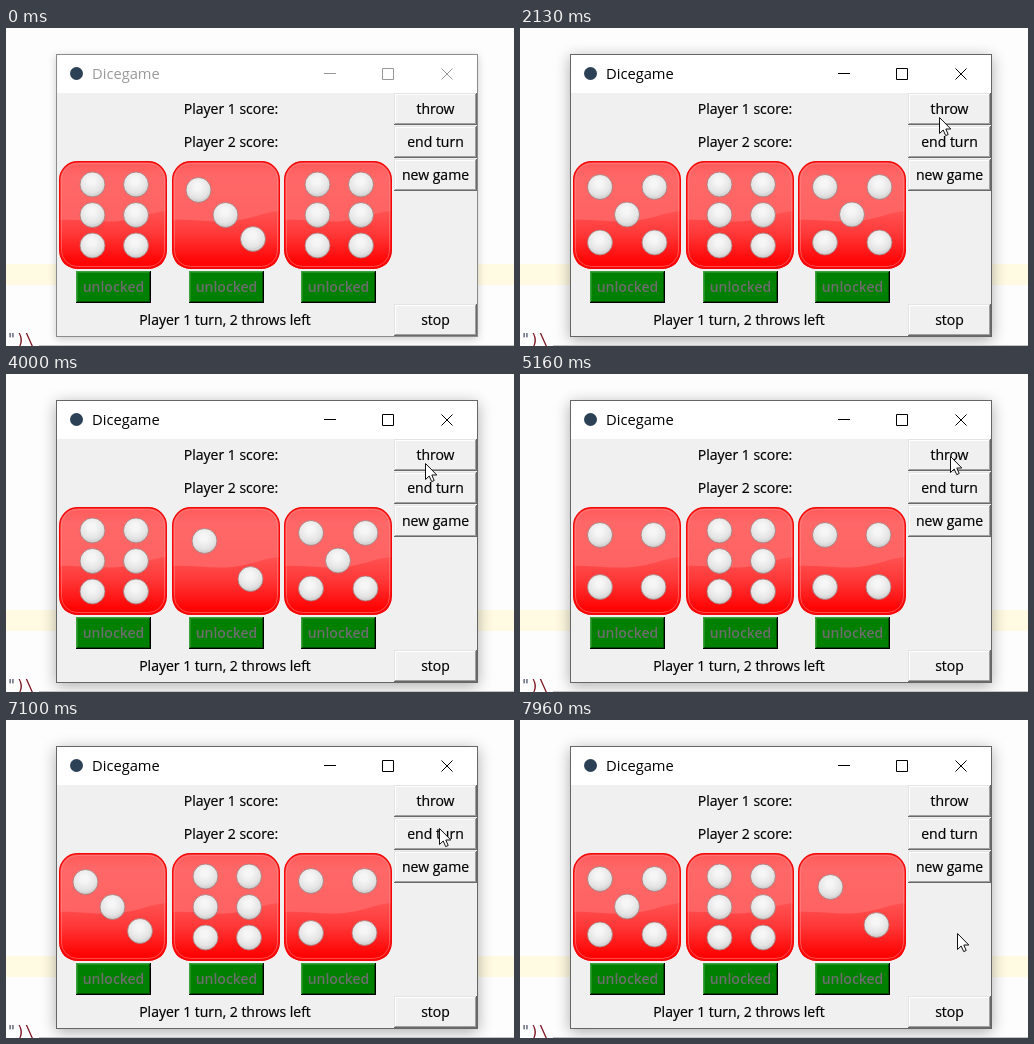
Write an HTML page that moves like this. It is 508 px wide and 318 px high and loops after 8000 ms.

```html
<!DOCTYPE html>
<html lang="en">
<head>
<meta charset="utf-8">
<title>Dicegame</title>
<style>
  html, body { margin: 0; width: 100%; height: 100%; overflow: hidden; background: #fdfdfd; }
  #stage { position: relative; width: 508px; height: 318px; max-height: 100%; overflow: hidden; contain: strict; }
  #line { position: absolute; left: 0; top: 236px; width: 508px; height: 21px; background: #fffae1; }
  #win { position: absolute; left: 50px; top: 26px; width: 420px; height: 281px; border: 1px solid #8c8c8c;
    background: linear-gradient(#fff 38px, #f0f0f0 38px); box-shadow: 0 2px 8px rgba(0, 0, 0, .2); }
  .active #win { border-color: #666; box-shadow: 0 3px 14px rgba(0, 0, 0, .32); }
  svg { position: absolute; left: 0; top: 0; display: block; overflow: hidden; }
  text { font: 14px "Open Sans", "Noto Sans", sans-serif; text-anchor: middle; stroke: #000; stroke-width: .2px; }
  .title { font-size: 14.7px; text-anchor: start; fill: #999; stroke: none; }
  .caps { fill: none; stroke: #999; }
  .active .title { fill: #000; }
  .active .caps { stroke: #000; }
  .lock { font-weight: 600; fill: #6d6d6d; stroke: none; }
  .code { font: 15px "DejaVu Sans Mono", monospace; text-anchor: start; fill: #7c1420; stroke: none; }
  .code tspan { fill: #4a5068; }
</style>
</head>
<body>
<div id="stage">
<div id="line"></div>
<div id="win"></div>
<svg width="508" height="318" viewBox="0 0 508 318">
  <defs>
    <linearGradient id="face" x1="0" y1="0" x2="0" y2="1">
      <stop offset="0" stop-color="#ff5a5a"/><stop offset=".15" stop-color="#ff6868"/>
      <stop offset=".55" stop-color="#ff6262"/>
    </linearGradient>
    <linearGradient id="low" x1="0" y1="0" x2="0" y2="1">
      <stop offset="0" stop-color="#ff5252"/><stop offset=".4" stop-color="#ff3838"/>
      <stop offset=".9" stop-color="#ff0404"/>
    </linearGradient>
    <radialGradient id="pip" cx=".47" cy=".36" r=".66">
      <stop offset=".2" stop-color="#f6f6f6"/><stop offset=".7" stop-color="#e4e4e4"/>
      <stop offset="1" stop-color="#c6c6c6"/>
    </radialGradient>
    <g id="die">
      <rect x=".5" y=".5" width="107" height="107" rx="18" fill="url(#face)"/>
      <path d="M1 59C20 58 40 62 60 60S92 51 107 50V90Q107 107 90 107H18Q1 107 1 90Z" fill="url(#low)"/>
      <rect x="2.5" y="2.5" width="103" height="103" rx="16" fill="none" stroke="#ff8c8c" stroke-opacity=".5"/>
      <rect x=".7" y=".7" width="106.6" height="106.6" rx="18" fill="none" stroke="#f40808" stroke-width="1.4"/>
    </g>
    <circle id="dot" r="12.5" fill="url(#pip)" stroke="#a87878" stroke-width=".8"/>
  </defs>
  <text class="code" x="1" y="317"><tspan>"</tspan>)\</text>
  <path d="M33 317.5H508" stroke="#c4c4c4"/>
  <circle cx="70.5" cy="45.5" r="6.5" fill="#2c4156"/>
  <text class="title" x="86" y="51">Dicegame</text>
  <path class="caps" d="M318 45.5h12M376.5 40.5h11v11h-11zM435.5 40.5l11 11m0-11l-11 11"/>
  <text x="225" y="86">Player 1 score:</text>
  <text x="225" y="119">Player 2 score:</text>
  <text x="219" y="297">Player 1 turn, 2 throws left</text>
  <g id="parts"></g>
  <circle id="glow" r="15" fill="#f0e73c" fill-opacity=".76"/>
  <path id="arrow" d="M.5 .5V16.5L4.2 13L6.7 18.6L9.2 17.5L6.8 12H11.8Z" fill="#fff" stroke="#111"/>
</svg>
</div>
<script>
const $ = id => document.getElementById(id);
const LOOP = 8000;
const DIE_X = [53, 166, 278];

// Bevel colours: top-left outer, inner, bottom-right inner, outer, fill
const GREY = ['#e3e3e3', '#fff', '#a0a0a0', '#696969', '#f0f0f0'];
const SUNK = ['#a0a0a0', '#696969', '#e3e3e3', '#fff', '#f0f0f0'];
const GREEN = ['#40a040', '#209020', '#004d00', '#000', '#008000'];

const PIPS = {
  1: [[54, 53.5]],
  2: [[32.5, 34], [78.5, 72]],
  3: [[26.5, 29], [53.5, 54], [81, 78]],
  4: [[27, 28], [80.5, 28], [27, 80], [80.5, 80]],
  5: [[27, 26], [81.5, 26], [54, 53.5], [27, 81.5], [81.5, 81.5]],
  6: [23.5, 54, 84.5].flatMap(y => [[33.5, y], [77, y]])
};

// [time, faces]
const ROLLS = [
  [0, '636'], [1860, '241'], [1930, '615'], [2000, '354'], [2060, '432'], [2130, '565'],
  [2210, '126'], [2290, '643'], [2360, '212'],
  [3600, '453'], [3680, '316'], [3760, '534'], [3840, '261'], [3920, '145'], [4000, '625'], [4080, '464'],
  [5390, '251'], [5470, '642'], [5550, '415'], [5630, '534'], [5710, '126'], [5790, '653'], [5860, '364'],
  [7490, '145'], [7570, '613'], [7650, '256'], [7730, '431'], [7800, '324'], [7880, '643'], [7960, '562']
];

const PRESSES = [[1790, 1860], [3520, 3600], [5240, 5390], [7410, 7490]];

// Pointer moves: [start, step length, steps, x, y]
const HOME = [409, 328];
const MOVES = [
  [110, 78.75, 9, 419, 98], [1040, 80, 2, 419, 89], [4230, 70, 2, 421, 105], [4460, 70, 2, 424, 113],
  [5010, 76.6, 4, 432, 72], [5470, 80, 4, 432, 112], [7100, 80, 1, 433, 108], [7180, 80, 2, 432, 91],
  [7650, 77.5, 5, 437, 213]
];

function button(x, y, w, h, [a, b, c, d, fill], label, cls = '', shift = 0) {
  const ring = (i, light, dark) =>
    `<path fill="${dark}" d="M${x + i} ${y + i}h${w - 2 * i}v${h - 2 * i}h${2 * i - w}z"/>` +
    `<path fill="${light}" d="M${x + i} ${y + i}h${w - 2 * i - 1}v${h - 2 * i - 1}h${2 * i + 1 - w}z"/>`;
  return ring(0, a, d) + ring(1, b, c) +
    `<rect x="${x + 2}" y="${y + 2}" width="${w - 4}" height="${h - 4}" fill="${fill}"/>` +
    `<text class="${cls}" x="${x + w / 2 + shift}" y="${y + 21 + shift}">${label}</text>`;
}

const side = (y, label, look = GREY, shift = 0) => button(388, y, 83, 32, look, label, '', shift);

$('parts').innerHTML =
  '<g id="throw"></g>' + side(98, 'end turn') + side(131, 'new game') + side(276, 'stop') +
  DIE_X.map((x, i) =>
    `<g transform="translate(${x} 133)"><use href="#die"/><g id="d${i}"></g></g>` +
    button(x + 17, 243, 75, 32, GREEN, 'unlocked', 'lock')).join('');

function pointer(t) {
  let [x, y] = HOME;
  for (const [start, step, n, tx, ty] of MOVES) {
    if (t < start) break;
    const p = Math.min(n, Math.floor((t - start) / step + 1.001)) / n;
    const e = p * (2 - p);
    x += (tx - x) * e;
    y += (ty - y) * e;
  }
  return [Math.round(x), Math.round(y)];
}

let shownFaces, shownPress;

function draw(t) {
  const faces = ROLLS.findLast(r => r[0] <= t)[1];
  if (faces !== shownFaces) {
    [...faces].forEach((f, i) => {
      $('d' + i).innerHTML = PIPS[f].map(([x, y]) => `<use href="#dot" x="${x}" y="${y}"/>`).join('');
    });
    shownFaces = faces;
  }
  const press = PRESSES.some(([a, b]) => t >= a && t < b);
  if (press !== shownPress) {
    $('throw').innerHTML = press ? side(65, 'throw', SUNK, 1) : side(65, 'throw');
    $('glow').style.display = press ? '' : 'none';
    shownPress = press;
  }
  $('stage').classList.toggle('active', t >= PRESSES[0][0]);
  const at = `translate(${pointer(t)})`;
  $('arrow').setAttribute('transform', at);
  $('glow').setAttribute('transform', at);
  $('arrow').style.display = t < MOVES[0][0] ? 'none' : '';
}

const begin = performance.now();
function tick() {
  draw((performance.now() - begin) % LOOP);
  requestAnimationFrame(tick);
}
tick();
</script>
</body>
</html>
```
